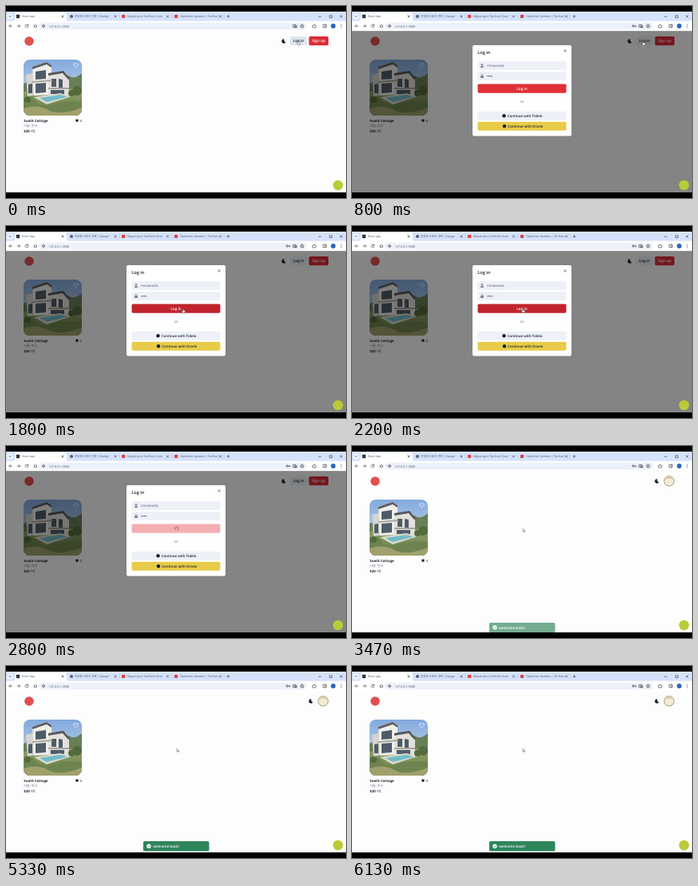
An HTML page for the animation above (6190 ms loop, 426 px wide and 240 px high).

```html
<!DOCTYPE html>
<html lang="en">
<head>
<meta charset="utf-8">
<title>Login flow</title>
<style>
  html, body { margin: 0; width: 100%; height: 100%; overflow: hidden; background: #000; }
  svg { display: block; width: 100vw; height: 100vh; }
  text { font: 4.3px "Open Sans", "Noto Sans CJK KR", "Noto Sans CJK", sans-serif; fill: #1a202c; text-rendering: geometricPrecision; }
  .b { font-weight: 700; }
  .s { font-weight: 600; font-size: 4.7px; }
  .mid { text-anchor: middle; }
  .w { fill: #fff; }
  .tab { font-size: 3.5px; fill: #4a5260; }
  .line { fill: none; stroke: #454b55; stroke-width: .7; stroke-linecap: round; stroke-linejoin: round; }
  #box { transform-origin: 213px 105px; }
</style>
</head>
<body>
<svg viewBox="0 0 426 240" preserveAspectRatio="none">
  <defs>
    <clipPath id="round"><rect x="22" y="67" width="73" height="70" rx="8"/></clipPath>
    <clipPath id="view"><rect y="7" width="426" height="226"/></clipPath>
    <linearGradient id="sky" x2="0" y2="1"><stop stop-color="#82a9dc"/><stop offset="1" stop-color="#dce8f2"/></linearGradient>
    <linearGradient id="lawn" x2="0" y2="1"><stop stop-color="#8fa269"/><stop offset="1" stop-color="#667c45"/></linearGradient>
    <path id="x" d="M-1.2-1.2 1.2 1.2M1.2-1.2-1.2 1.2"/>
    <path id="moon" d="M.6-2.6A2.7 2.7 0 1 0 2.6 1 2.5 2.5 0 0 1 .6-2.6Z" fill="#1a202c"/>
  </defs>

  <rect width="426" height="240"/>
  <g clip-path="url(#view)">
    <rect y="7" width="426" height="226" fill="#fdfdfe"/>

    <!-- page -->
    <circle cx="29" cy="44" r="5.8" fill="#e2504e"/>
    <g id="guest">
      <use href="#moon" x="348" y="44"/>
      <rect id="loginBtn" x="356" y="38" width="21" height="11.2" rx="1.8" fill="#edf2f7"/>
      <text class="s mid" x="366.5" y="45.4">Log in</text>
      <rect x="379.5" y="38" width="24.5" height="11.2" rx="1.8" fill="#db2c38"/>
      <text class="s w mid" x="391.7" y="45.4">Sign up</text>
    </g>
    <g id="member">
      <use href="#moon" x="382" y="44"/>
      <circle cx="397.3" cy="43.8" r="6.3" fill="#f5ead2" stroke="#77745f" stroke-width=".7"/>
      <path d="M391.4 42.2A6 6 0 0 1 403.2 42.2Q397 39.5 391.4 42.2Z" fill="#d7cda9"/>
    </g>

    <g clip-path="url(#round)">
      <rect x="22" y="67" width="73" height="70" fill="url(#sky)"/>
      <path d="M22 97Q32 91 45 96L69 94Q74 84 80 88T95 84V118H22Z" fill="#687f57"/>
      <path d="M22 107 95 103V137H22Z" fill="url(#lawn)"/>
      <path d="M25 86 38 83V111L27 113Z" fill="#d5d4cf"/>
      <path d="M33 76 51 70 57 74V111L35 112Z" fill="#f0eee9"/>
      <path d="M33 76 51 70 57 74V77L51 73 33 79Z" fill="#5c5d61"/>
      <path d="M53 85 72 82 79 91V112L53 112Z" fill="#e3e1db"/>
      <path d="M53 84 72 81 80 91 78 92 71 84 53 87Z" fill="#55575b"/>
      <g fill="#4e5c68">
        <path d="M37 82 50 80V91L37 92ZM37 97 50 96V108L37 109ZM57 91H63V101H57ZM66 91 71 92V102H66ZM56 105H73V110H56ZM28 98 33 97V109H28Z"/>
      </g>
      <path d="M33 94 58 92V94L33 96ZM53 102H79V104H53Z" fill="#a8a59d"/>
      <path d="M35 114 68 109 82 113 51 123Z" fill="#dad9cc"/>
      <path d="M42 115 68 111 77 113.5 51 120Z" fill="#70bbc7"/>
      <path d="M22 117Q31 110 36 118T53 124Q71 117 95 120V137H22Z" fill="#6e8450"/>
      <path d="M22 128Q39 122 53 130T95 127V137H22Z" fill="#a0a16c"/>
      <g fill="#536b3c"><circle cx="27" cy="117" r="4"/><circle cx="82" cy="109" r="4"/><circle cx="89" cy="106" r="6"/></g>
    </g>
    <path d="M87.5 77Q84.5 74.7 84.5 73.2 84.8 71.4 86.4 71.8L87.5 72.9 88.6 71.8Q90.3 71.4 90.5 73.2 90.5 74.7 87.5 77Z" fill="none" stroke="#fff" stroke-width=".7"/>
    <text class="b" x="22.3" y="145" font-size="4">Sunlit Cottage</text>
    <path d="M89 140.7 89.7 142.3 91.4 142.4 90.1 143.5 90.5 145.2 89 144.3 87.5 145.2 87.9 143.5 86.6 142.4 88.3 142.3Z"/>
    <text x="92.5" y="144.9">4</text>
    <text x="22.3" y="151" style="fill:#697487;font-size:4px">서울, 한국</text>
    <text x="22.3" y="157.7"><tspan class="b">$20</tspan> /박</text>

    <!-- dialog -->
    <rect id="shade" y="31" width="426" height="202" fill="#000" opacity=".48"/>
    <g id="box">
      <rect x="151" y="49" width="124" height="113.5" rx="2" fill="#fff"/>
      <text class="s" x="157.3" y="60.2" style="font-size:5.6px">Log in</text>
      <use href="#x" x="267.2" y="56" class="line"/>
      <g fill="#edf1f7">
        <rect x="157.5" y="69" width="111" height="11" rx="1.8"/>
        <rect x="157.5" y="82" width="111" height="11" rx="1.8"/>
        <rect x="157.5" y="131.7" width="111" height="11" rx="1.8"/>
      </g>
      <g fill="#7b8697">
        <circle cx="163" cy="73.2" r="1.25"/>
        <path d="M160.8 77Q161 74.8 163 74.8T165.2 77Z"/>
        <rect x="161" y="87" width="4" height="2.9" rx=".4"/>
        <path d="M161.9 87V86.2A1.1 1.1 0 0 1 164.1 86.2V87" fill="none" stroke="#7b8697" stroke-width=".6"/>
      </g>
      <text x="169" y="76.2" style="fill:#4f5868">minwooda</text>
      <g fill="#2d3748"><circle cx="170" cy="87.7" r=".65"/><circle cx="171.8" cy="87.7" r=".65"/><circle cx="173.6" cy="87.7" r=".65"/><circle cx="175.4" cy="87.7" r=".65"/></g>
      <rect id="submit" x="157.5" y="97.5" width="111" height="11.2" rx="1.8" fill="#e02f37"/>
      <text id="submitText" class="s w mid" x="213" y="104.8">Log in</text>
      <g id="busy"><g transform="translate(213.8 103.1)">
        <path id="spin" d="M1.4-1.5A2 2 0 1 0 2 .2" fill="none" stroke="#b93240" stroke-width=".8"/>
      </g></g>
      <path d="M157.5 120H206M220 120H268.5" stroke="#f0f2f6" stroke-width=".4"/>
      <text class="mid" x="213" y="121.4" style="fill:#5c6573;font-size:3.5px">OR</text>
      <circle cx="190.5" cy="137.2" r="2.2" fill="#1a202c"/>
      <text class="s" x="194.7" y="138.9" style="font-size:4.4px">Continue with Tidelo</text>
      <rect x="157.5" y="144.7" width="111" height="11" rx="1.8" fill="#e8cc49"/>
      <circle cx="191" cy="150.2" r="2.2" fill="#1a202c"/>
      <text class="s" x="195.2" y="151.9" style="font-size:4.4px">Continue with Orami</text>
    </g>

    <!-- browser bars -->
    <rect y="7" width="426" height="12.5" fill="#d5e2fb"/>
    <rect y="18.7" width="426" height="12.5" fill="#fff"/>
    <path d="M9 19Q11 19 11 17V11Q11 8.5 13 8.5H74Q76 8.5 76 11V17Q76 19 78 19Z" fill="#fff"/>
    <rect x="1.5" y="9.5" width="7.5" height="7" rx="2" fill="#edf3fd"/>
    <rect x="41" y="20.8" width="336" height="8.8" rx="4.4" fill="#edf1fa"/>
    <rect x="12.8" y="10.8" width="4.4" height="4.4" rx=".5" fill="#303944"/>
    <circle cx="82" cy="13" r="2.1" fill="#59636b"/>
    <rect x="145" y="10.9" width="4.2" height="4.2" rx=".5" fill="#d9443f"/>
    <rect x="211" y="10.9" width="4.2" height="4.2" rx=".5" fill="#d9443f"/>
    <text class="tab" x="20" y="14.4">React App</text>
    <text class="tab" x="86" y="14.4">반응형 사용자 선택 | Django</text>
    <text class="tab" x="152" y="14.4">Migrating to TanStack Quer</text>
    <text class="tab" x="218" y="14.4">Optimistic Updates | TanStac</text>
    <path d="M142 10.5V15.5M208 10.5V15.5M273 10.5V15.5" stroke="#9baac5" stroke-width=".4"/>
    <g class="line">
      <path d="M4 12.4 5.2 13.7 6.4 12.4M277 13H280M278.5 11.5V14.5M391.5 13.2H394.5M405.7 11.9H408.5V14.6H405.7Z"/>
      <use href="#x" x="71" y="13"/><use href="#x" x="137" y="13"/><use href="#x" x="202.5" y="13"/><use href="#x" x="268.5" y="13"/><use href="#x" x="420" y="13"/>
      <path d="M7.5 25H4M5.4 23.5 4 25 5.4 26.5M14 25H17.5M16.1 23.5 17.5 25 16.1 26.5M27.6 24A1.9 1.9 0 1 0 27.8 25.6M27.8 23V24.3H26.5M34.8 25 36.8 23.2 38.8 25M35.4 24.7V26.7H38.2V24.7"/>
      <circle cx="47" cy="25" r="1.5"/><path d="M47 25V25.7"/>
      <rect x="360" y="23.5" width="3.2" height="3"/><path d="M362 24.8H364.2V27H362Z"/>
      <path d="M371 22.8 371.7 24.3 373.3 24.4 372.1 25.5 372.5 27.1 371 26.2 369.5 27.1 369.9 25.5 368.7 24.4 370.3 24.3Z"/>
      <path d="M384.5 24H385.5Q386 22 386.8 24H388V27H384.5Z"/>
      <path d="M397.7 23.2H401.3V26.8H397.7ZM400 23.2V26.8"/>
      <path d="M420 23.2V23.3M420 25V25.1M420 26.8V26.9" stroke-width="1"/>
    </g>
    <g id="key" class="line"><circle cx="352.2" cy="25" r="1.2"/><path d="M353.4 25H356M355.5 25V26"/></g>
    <circle cx="410" cy="25" r="2.9" fill="#2766bd"/>
    <text x="53.5" y="26.5" style="font-size:3.8px;fill:#48505c">127.0.0.1:3000</text>

    <circle cx="416" cy="224" r="6.3" fill="#b9cb38"/>

    <g id="toast">
      <rect x="172" y="219" width="82.5" height="12.6" rx="1.8" fill="#2f855a"/>
      <circle cx="179" cy="225.2" r="2.7" fill="#fff"/>
      <path d="M177.7 225.3 178.7 226.3 180.4 224.3" fill="none" stroke="#2f855a" stroke-width=".8"/>
      <text class="s w" x="184.3" y="226.9" style="font-size:4.6px">welcome back!</text>
    </g>

    <g id="pointer">
      <path id="hand" d="M-.6 1V-1.6Q0-2.3.6-1.6V.1L2 .5Q2.5.7 2.4 1.5L2 3.4H-.4L-1.8 1.4Q-1.7.5-.6 1Z" fill="#fff" stroke="#222" stroke-width=".5"/>
      <path id="arrow" d="M0-1.6V2.2L.9 1.4 1.5 2.8 2.1 2.5 1.5 1.2H2.7Z" fill="#fff" stroke="#222" stroke-width=".4"/>
    </g>
  </g>
</svg>
<script>
  const LOOP = 6190, OPEN = 480, BUSY = 2350, DONE = 3260, SIGNED = 3400;

  // Each row is [time, value, easing to the next row].
  function play(id, prop, rows) {
    const frames = rows.map(([t, value, easing = "linear"]) => ({ offset: t / LOOP, [prop]: value, easing }));
    frames.push({ offset: 1, [prop]: rows[rows.length - 1][1] });
    document.getElementById(id).animate(frames, { duration: LOOP, iterations: Infinity }).startTime = 0 + start;
  }
  const start = document.timeline.currentTime || 0;
  const show = (id, from, to = LOOP) => play(id, "opacity", [
    [0, from ? 0 : 1, "step-end"], [from, 1, "step-end"], ...(to < LOOP ? [[to, 0]] : [])
  ]);
  const at = (x, y) => `translate(${x}px, ${y}px)`;
  const swift = "cubic-bezier(.4, 0, .2, 1)";

  show("guest", 0, SIGNED);
  show("member", SIGNED);
  show("key", OPEN);
  play("loginBtn", "fill", [[0, "#dfe4f1"], [OPEN, "#dfe4f1"], [OPEN + 200, "#edf2f7"]]);

  play("shade", "opacity", [[0, 0], [OPEN, 0, "ease-out"], [OPEN + 150, .48], [DONE, .48, "ease-in"], [DONE + 140, 0]]);
  play("box", "opacity", [[0, 0], [OPEN, 0, "ease-out"], [OPEN + 150, 1], [DONE, 1, "ease-in"], [DONE + 120, 0]]);
  play("box", "transform", [[0, "scale(.95)"], [OPEN, "scale(.95)", "ease-out"], [OPEN + 150, "scale(1)"], [DONE, "scale(1)"], [DONE + 120, "scale(.95)"]]);

  play("submit", "fill", [[0, "#e02f37"], [1420, "#e02f37"], [1620, "#c0232b"], [BUSY, "#c0232b"], [BUSY + 150, "#e5535a"]]);
  play("submit", "opacity", [[0, 1], [BUSY, 1], [BUSY + 150, .46]]);
  show("submitText", 0, BUSY);
  show("busy", BUSY);
  play("spin", "transform", [[0, "rotate(0deg)"], [LOOP, `rotate(${360 * 14}deg)`]].slice(0, 1).concat([[LOOP - 1, `rotate(${360 * 14}deg)`]]));

  play("pointer", "transform", [
    [0, at(366.3, 45)], [750, at(366.3, 45), "ease-in-out"], [1400, at(265.5, 107), "ease-in-out"],
    [1950, at(214.2, 105)]
  ]);
  show("hand", 0, BUSY);
  show("arrow", DONE + 100);

  play("toast", "opacity", [[0, 0], [3300, 0, swift], [3700, 1]]);
  play("toast", "transform", [[0, at(0, 5)], [3300, at(0, 5), swift], [3700, at(0, 0)]]);
</script>
</body>
</html>
```
